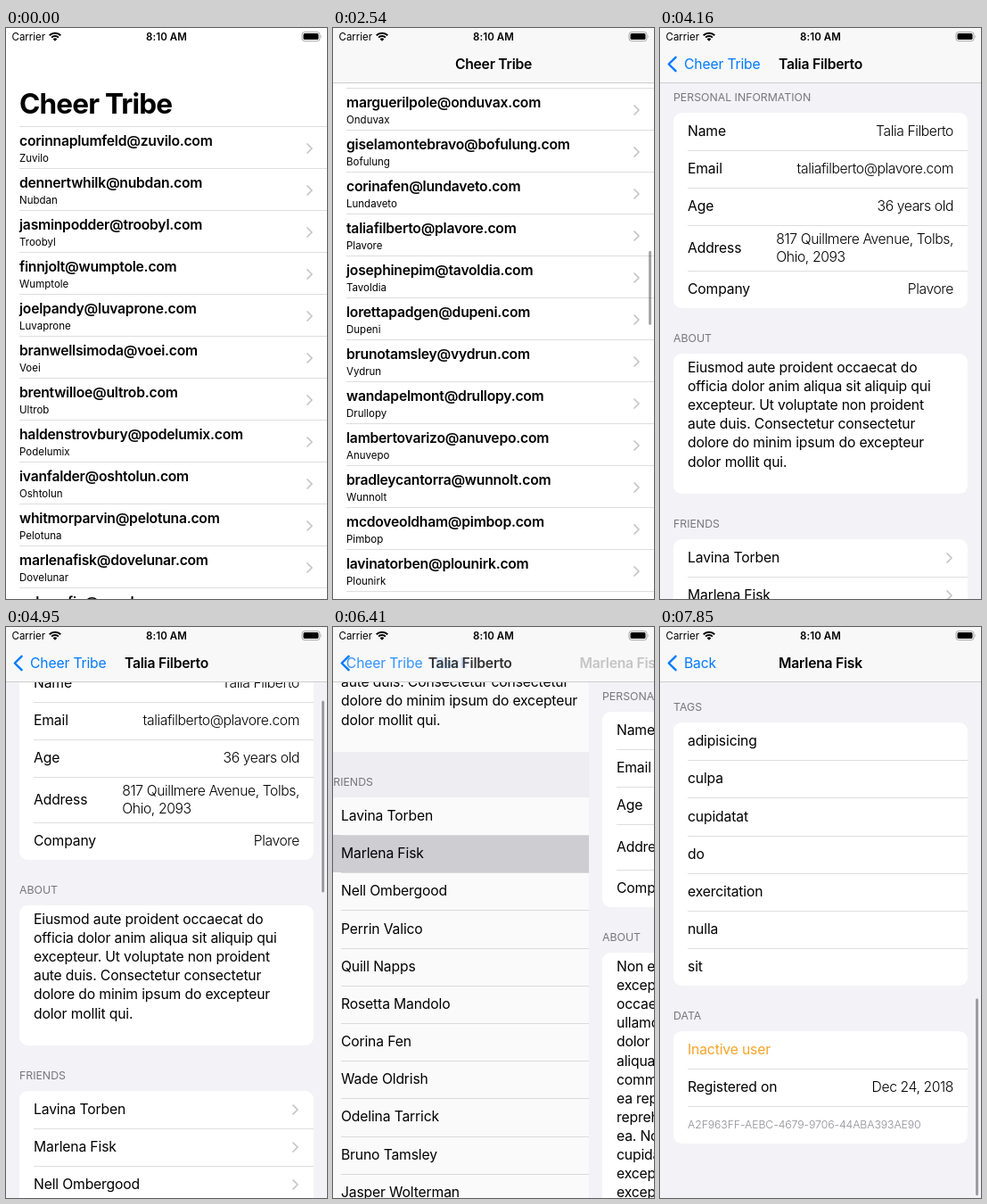
An HTML page that plays this animation: 360x640 px, repeating every 7.99 s.

```html
<!DOCTYPE html>
<html lang="en">
<head>
<meta charset="utf-8">
<title>Contacts</title>
<style>
html, body { margin: 0; width: 100%; height: 100%; overflow: hidden; background: #fff; }
#stage { position: relative; width: 360px; height: 640px; overflow: hidden; color: #000;
  font: 400 15.7px/20px Inter, Roboto, sans-serif; letter-spacing: -.15px; white-space: nowrap; }
.page { position: absolute; inset: 0; overflow: hidden; background: #f2f2f7; }
.page.list { background: #fff; }
.dim { position: absolute; inset: 0; background: #000; opacity: 0; }
.thumb { position: absolute; top: 0; right: 3px; width: 3px; border-radius: 2px; background: rgba(0, 0, 0, .35); }
.chev { position: absolute; width: 7px; height: 12px; top: 50%; margin-top: -6px;
  fill: none; stroke: #c4c4c7; stroke-width: 1.7; stroke-linecap: round; stroke-linejoin: round; }

.list h1 { position: absolute; left: 15px; top: 65px; margin: 0; font: 700 31.5px/40px Inter, Roboto, sans-serif; letter-spacing: -.8px; }
.people { position: absolute; top: 110px; width: 360px; }
.person { position: relative; box-sizing: border-box; height: 47px; padding: 7px 0 0 15px; }
.person::before { content: ""; position: absolute; left: 15px; right: 0; top: 0; height: 1px; background: #dedee0; }
.person b { display: block; font-weight: 600; letter-spacing: -.24px; }
.person small { display: block; font-size: 11.5px; line-height: 18px; letter-spacing: 0; }
.person .chev { right: 16px; margin-top: -5px; }

.detail .scroll { padding-top: 44.5px; }
.detail h2 { box-sizing: border-box; height: 50.4px; margin: 0; padding: 25.5px 0 0 15px;
  font-size: 12.3px; line-height: 16px; font-weight: 400; letter-spacing: 0; color: #77777c; }
.card { margin: 0 15px; border-radius: 9.6px; overflow: hidden; background: #fff; }
.row { position: relative; display: flex; align-items: center; justify-content: space-between;
  height: 42.2px; padding: 0 16px; }
.row.tall { height: 50.5px; }
.row + .row::before { content: ""; position: absolute; left: 16px; right: 0; top: 0; height: 1px; background: #dedee0; }
.row i { font-style: normal; font-weight: 300; letter-spacing: -.4px; }
.row .chev { right: 17px; }
.about { padding: 5.5px 16px 25.9px; line-height: 21.1px; }
.inactive { color: #f7a325; }
.code { font-size: 12.3px; font-weight: 300; letter-spacing: -.1px; color: #8e8e93; }
.pressed { background: #d1d1d6; }

#bar { position: absolute; left: 0; top: 0; width: 360px; height: 62px; box-sizing: border-box; border-bottom: 1px solid #fff; background: #fff; }
#bar.solid { background: #f8f8f9; border-color: #cdcdd0; }
#bar svg { position: absolute; left: 0; top: 0; }
.title, .back { position: absolute; top: 30.5px; }
.title { left: 0; width: 360px; text-align: center; font-weight: 600; letter-spacing: -.24px; }
.back { left: 27px; color: #007aff; }
</style>
</head>
<body>
<div id="stage">
  <div class="page list" id="people"></div>
  <div class="page detail" id="first"></div>
  <div class="page detail" id="second"></div>
  <div id="bar">
    <svg width="360" height="62" font-size="11.5">
      <text x="6.5" y="14" letter-spacing="0">Carrier</text>
      <g fill="none" stroke="#000" stroke-width="2">
        <path d="M48.7 8.2A9 9 0 0 1 61.3 8.2M51.1 10.6A5.6 5.6 0 0 1 58.9 10.6"/>
      </g>
      <path d="M55 14.7L52.7 12.4A3.2 3.2 0 0 1 57.3 12.4Z"/>
      <text x="180" y="14" text-anchor="middle" font-weight="600" letter-spacing="0.1">8:10 AM</text>
      <rect x="332" y="4.6" width="20" height="10" rx="2.8" fill="none" stroke="#a6a6a6"/>
      <rect x="333.5" y="6.1" width="17" height="7" rx="1.6"/>
      <path d="M353 8q1.6 1.6 0 3.2z" fill="#a6a6a6"/>
      <path id="arrow" d="M17.6 32.8L9.8 40.5L17.6 48.2" fill="none" stroke="#007aff" stroke-width="2.4" stroke-linecap="round" stroke-linejoin="round"/>
    </svg>
    <div class="title" id="listTitle">Cheer Tribe</div>
    <div class="back" id="listBack">Cheer Tribe</div>
    <div class="title" id="firstTitle">Talia Filberto</div>
    <div class="back" id="firstBack">Back</div>
    <div class="title" id="secondTitle">Marlena Fisk</div>
  </div>
</div>
<script>
const LOOP = 7990;
const $ = id => document.getElementById(id);
const chevron = '<svg class="chev" viewBox="0 0 7 12"><path d="M1 1l5 5-5 5"/></svg>';

const people = `corinnaplumfeld@zuvilo dennertwhilk@nubdan jasminpodder@troobyl finnjolt@wumptole
joelpandy@luvaprone branwellsimoda@voei brentwilloe@ultrob haldenstrovbury@podelumix ivanfalder@oshtolun
whitmorparvin@pelotuna marlenafisk@dovelunar colmanfip@vosulp simoneplanker@vandolpe jeffnimbs@plunotto
odelinatarrick@wuplast perrinvalico@tubrano nellombergood@kelvoda quillnapps@jomurex rosettamandolo@findupa
wadeoldrish@brunolap jasperwolterman@sumotil zorapinkley@egravon tildamorvane@yopletta amosgrindle@nalvoru
petrawindlow@quolben hugofarnstead@mirvopa stellabrimm@zandulo ottolarkwell@pruvina marguerilpole@onduvax
giselamontebravo@bofulung corinafen@lundaveto taliafilberto@plavore josephinepim@tavoldia lorettapadgen@dupeni
brunotamsley@vydrun wandapelmont@drullopy lambertovarizo@anuvepo bradleycantorra@wunnolt mcdoveoldham@pimbop
lavinatorben@plounirk elsiegorman@trevulo`.split(/\s+/);

const friends = ["Lavina Torben", "Marlena Fisk", "Nell Ombergood", "Perrin Valico", "Quill Napps", "Rosetta Mandolo",
  "Corina Fen", "Wade Oldrish", "Odelina Tarrick", "Bruno Tamsley", "Jasper Wolterman", "Zora Pinkley"];

const capital = s => s[0].toUpperCase() + s.slice(1);
const row = (label, value = "", cls = "") => `<div class="row ${cls}"><span>${label}</span>${value}</div>`;
const section = (title, body) => `<h2>${title}</h2><div class="card">${body}</div>`;
const info = (...values) => section("PERSONAL INFORMATION", ["Name", "Email", "Age", "Address", "Company"]
  .map((label, i) => row(label, `<i>${values[i]}</i>`, i === 3 ? "tall" : "")).join(""));
const about = text => section("ABOUT", `<div class="about">${text.replace(/\n/g, "<br>")}</div>`);
const friendList = names => section("FRIENDS", names.map(n => row(n, chevron, "friend")).join(""));
const fill = (page, html) => {
  page.innerHTML = `<div class="scroll">${html}</div><div class="thumb"></div><div class="dim"></div>`;
};

fill($("people"), `<h1>Cheer Tribe</h1><div class="people">` + people.map(mail => {
  const company = capital(mail.split("@")[1]);
  return `<div class="person"><b>${mail}.com</b><small>${company}</small>${chevron}</div>`;
}).join("") + "</div>");

fill($("first"),
  info("Talia Filberto", "taliafilberto@plavore.com", "36 years old", "817 Quillmere Avenue, Tolbs,<br>Ohio, 2093", "Plavore") +
  about(`Eiusmod aute proident occaecat do
officia dolor anim aliqua sit aliquip qui
excepteur. Ut voluptate non proident
aute duis. Consectetur consectetur
dolore do minim ipsum do excepteur
dolor mollit qui.`) +
  friendList(friends));

fill($("second"),
  info("Marlena Fisk", "marlenafisk@dovelunar.com", "28 years old", "206 Plumwick Street, Fandoleen,<br>Louisiana, 518", "Dovelunar") +
  about(`Non excepteur anim dolore sunt
excepteur sunt anim deserunt ad
occaecat tempor aute tempor irure. Velit
ullamco sint sunt proident aliquip fugiat
dolor nisi. Aliquip nostrud quis fugiat
aliqua nostrud proident incididunt in
commodo aliquip ex do esse. Quis aute
ea reprehenderit deserunt est
reprehenderit consectetur pariatur esse
ea. Non sit incididunt velit ipsum elit
cupidatat et occaecat. Nostrud ullamco
excepteur amet proident. Dolor
excepteur incididunt excepteur
consectetur anim ea nulla laboris
magna sit.`) +
  friendList(["Colman Fip", "Jeff Nimbs", "Otto Larkwell", "Talia Filberto", "Wanda Pelmont"]) +
  section("TAGS", ["adipisicing", "culpa", "cupidatat", "do", "exercitation", "nulla", "sit"].map(tag => row(tag)).join("")) +
  section("DATA", row("Inactive user", "", "inactive") + row("Registered on", "<i>Dec 24, 2018</i>") +
    row("A2F963FF-AEBC-4679-9706-44ABA393AE90", "", "code")));

// The picture only changes at these moments: [from, to, steps].
const ticks = [[1160, 1500, 4], [1930, 2350, 5], [2540, 2540, 1], [3140, 3690, 6], [4160, 4160, 1],
  [4740, 5500, 8], [5660, 5780, 2], [6290, 6850, 6], [7190, 7850, 7]]
  .flatMap(([from, to, n]) => Array.from({ length: n }, (_, i) => from + (to - from) * i / Math.max(1, n - 1)));

const smooth = (t, from, to) => {
  const x = Math.min(1, Math.max(0, (t - from) / (to - from)));
  return x * x * (3 - 2 * x);
};
// Critically damped spring from 1 to 0.
const spring = (t, start) => {
  const d = Math.max(0, t - start) * .016;
  return (1 + d) * Math.exp(-d);
};
const place = (id, x, opacity) => {
  $(id).style.transform = `translateX(${x}px)`;
  $(id).style.opacity = opacity;
};
const showPage = (id, x, dim, scroll, thumbTop, thumbHeight, thumbOn) => {
  const [content, thumb, shade] = $(id).children;
  $(id).style.transform = `translateX(${Math.round(x)}px)`;
  content.style.transform = `translateY(${-Math.round(scroll)}px)`;
  thumb.style.transform = `translateY(${thumbTop}px)`;
  thumb.style.height = thumbHeight + "px";
  thumb.style.opacity = thumbOn ? 1 : 0;
  shade.style.opacity = dim * .1;
};
const tappedPerson = document.querySelectorAll(".person")[31];
const tappedFriend = $("first").querySelectorAll(".friend")[1];

function render(now) {
  const clock = now % LOOP;
  const t = ticks.reduce((last, tick) => tick <= clock ? tick : last, 0);
  const p = t < 3140 ? 1 : spring(t, 3190);
  const q = spring(t, 6350);

  const listY = t < 1160 ? 0 : 155 * smooth(t, 1080, 1500) + 1204 * smooth(t, 1850, 2380);
  const firstY = t < 4740 ? 0 : 380 * smooth(t, 4650, 5500) + (t >= 5660) + (t >= 5780);
  const secondY = t < 7190 ? 0 : 917 * smooth(t, 7100, 7850);

  showPage("people", -108 * (1 - p), 1 - p, listY, 63 + Math.max(0, listY - 52) / 7, 83, t >= 1160 && t < 3140);
  showPage("first", 360 * p - 108 * (1 - q), 1 - q, firstY, 65 + firstY * .332, 215, t >= 4740 && t < 5780);
  showPage("second", 360 * q, 0, secondY, 65 + secondY * .383, 221, t >= 7190);
  tappedPerson.classList.toggle("pressed", t >= 3140);
  tappedFriend.classList.toggle("pressed", t >= 6290);

  const collapsed = listY > 40;
  $("bar").classList.toggle("solid", collapsed);
  $("arrow").style.opacity = 1 - p;
  place("listTitle", -112 * (1 - p), collapsed ? p : 0);
  place("listBack", 112 * p - 60 * (1 - q), (1 - p) * q);
  place("firstTitle", 180 * p - 130 * (1 - q), (1 - p) * q);
  place("firstBack", 110 * q, 1 - q);
  place("secondTitle", 180 * q, 1 - q);
}

const start = performance.now();
function loop() {
  render(performance.now() - start);
  requestAnimationFrame(loop);
}
loop();
</script>
</body>
</html>
```
